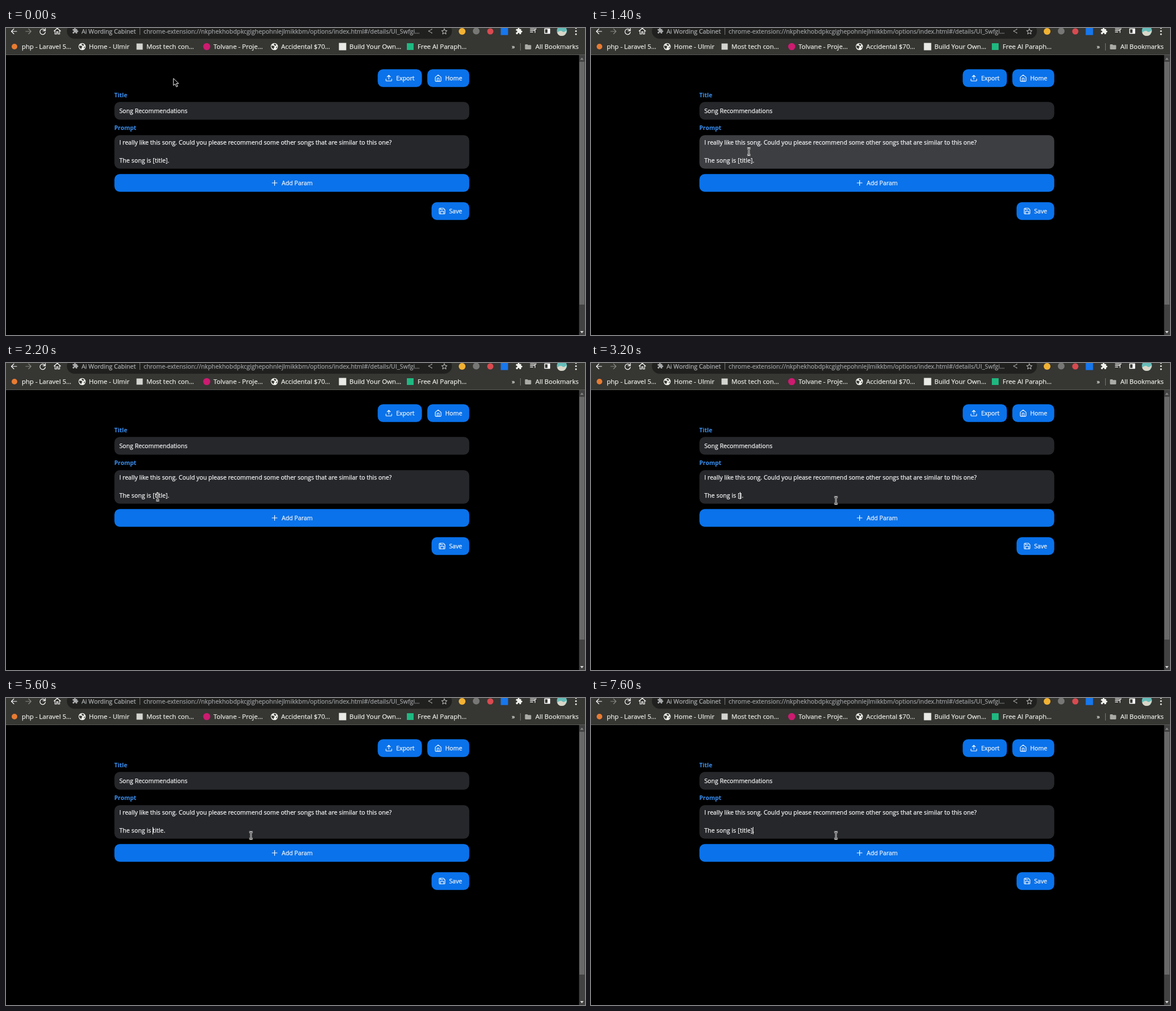
An HTML page for the animation above (8000 ms loop, 1027 by 545 pixels).

```html
<!DOCTYPE html>
<html lang="en">
<head>
<meta charset="utf-8">
<title>Prompt editor</title>
<style>
  html, body { margin: 0; width: 100%; height: 100%; overflow: hidden; background: #000; }
  svg { display: block; }
  text {
    font: 10.67px "Open Sans", "Noto Sans", sans-serif; white-space: pre;
    fill: #f4f5f6; stroke: #f4f5f6; stroke-width: 0.25;
  }
  .label { font-weight: 700; font-size: 10.5px; fill: #3a8ff0; stroke: none; }
  .mark { font-size: 11.5px; fill: #eaeae6; stroke: #eaeae6; }
  .url { font-size: 10.8px; fill: #9c9da0; stroke: #9c9da0; }
  .button { fill: #0a72ea; }
  .field { fill: #26272a; }
  .line { fill: none; stroke: #fff; stroke-width: 2; stroke-linecap: round; stroke-linejoin: round; }
  .beam { fill: none; stroke: #fff; stroke-width: 2.8; }
  .beam + .beam { stroke: #000; stroke-width: 1; }
  #line { letter-spacing: 0.08px; }
</style>
</head>
<body>
<svg id="stage" width="1027" height="545" viewBox="0 0 1027 545">
  <g id="browser">
    <path fill="#363633" d="M0 0h1027v47H0z"/>
    <path fill="#5b5b58" d="M0 47h1027v1H0z"/>
    <rect x="108" y="-8" width="683" height="27" rx="13.5" fill="#20211f"/>
    <path stroke="#777" d="M237.5 0v12M912.5 27v13"/>
    <path fill="#424242" d="M1016.5 48h10.5v497h-10.5z"/>
    <path fill="#696969" d="M1017 60h9v431h-9z"/>
    <path fill="#858585" d="M1018.5 56.5l3-4 3 4z"/>
    <path fill="#d8d8d8" d="M1018.5 538l3 4 3-4z"/>
  </g>
  <g id="page">
    <rect class="field" x="192.3" y="131.3" width="629.4" height="31.4" rx="9.6"/>
    <rect class="field" id="area" x="192.3" y="190.3" width="629.4" height="59.4" rx="9.6"/>
  </g>
  <rect id="selection" y="227" height="18" fill="#3367d1"/>
  <text id="line" x="201" y="239"></text>
  <rect id="caret" y="229" width="1" height="13" fill="#fff"/>
  <path id="arrow" fill="#000" stroke="#fff" d="M0 0v12.5l3-2.7 2.3 5.2 2.2-1-2.3-5h4z"/>
  <g id="ibeam">
    <path class="beam" d="M-3-6h2L0-5l1-1h2M0-5V5M-3 6h2L0 5l1 1h2"/>
    <path class="beam" d="M-3-6h2L0-5l1-1h2M0-5V5M-3 6h2L0 5l1 1h2"/>
  </g>
</svg>
<script>
const $ = id => document.getElementById(id);
const browser = $('browser'), page = $('page');

function add(parent, tag, attrs, content = '') {
  const el = document.createElementNS('http://www.w3.org/2000/svg', tag);
  for (const key in attrs) el.setAttribute(key, attrs[key]);
  el.textContent = content;
  parent.append(el);
  return el;
}
const text = (parent, x, y, content, cls = '') => add(parent, 'text', { x, y, class: cls }, content);
const dot = (x, y, r, fill) => add(browser, 'circle', { cx: x, cy: y, r, fill });
const square = (x, y, size, fill) =>
  add(browser, 'rect', { x: x - size / 2, y: y - size / 2, width: size, height: size, fill });

// Icons are drawn on a 24 unit grid centred at x, y.
const place = (x, y, scale) => `translate(${x} ${y}) scale(${scale}) translate(-12 -12)`;
const outline = (parent, d, x, y, scale = 0.56, style = '') =>
  add(parent, 'path', { d, class: 'line', transform: place(x, y, scale), style });
const solid = (d, x, y, scale, fill) =>
  add(browser, 'path', { d, fill, transform: place(x, y, scale) });

const ICON = {
  back: 'M21 12H4M12 4l-8 8 8 8',
  forward: 'M3 12h17M12 4l8 8-8 8',
  reload: 'M20 4v7h-7M19 10a8 8 0 1 0 1 5',
  house: 'M2 12L12 3l10 9M5 10v11h5v-7h4v7h5V10',
  puzzle: 'M20.5 11H19V7c0-1.1-.9-2-2-2h-4V3.5a2.5 2.5 0 0 0-5 0V5H4c-1.1 0-2 .9-2 2v3.8h1.5a2.7 2.7 0 0 1 0 5.4H2V20c0 1.1.9 2 2 2h3.8v-1.5a2.7 2.7 0 0 1 5.4 0V22H17c1.1 0 2-.9 2-2v-4h1.5a2.5 2.5 0 0 0 0-5z',
  share: 'M18 5L6 12l12 7M18 4v2M18 18v2M6 11v2',
  star: 'M12 2l3 7 7 .6-5.4 4.8L18.3 22 12 18l-6.3 4 1.7-7.6L2 9.6 9 9z',
  queue: 'M3 5h13M3 10h13M3 15h8M18 17V5h4',
  panel: 'M3 4h18v16H3z',
  folder: 'M2 6q0-2 2-2h6l2 2h8q2 0 2 2v10q0 2-2 2H4q-2 0-2-2z',
  land: 'M3 9l7 1 3 3-3 3v4L4 15zM11 3l7 3-2 4-5-2zM17 13l4-1-3 6z',
  upload: 'M3 15v4a2 2 0 0 0 2 2h14a2 2 0 0 0 2-2v-4M17 8l-5-5-5 5M12 3v12',
  home: 'M3 9l9-7 9 7v11a2 2 0 0 1-2 2H5a2 2 0 0 1-2-2zM9 22V12h6v10',
  save: 'M19 21H5a2 2 0 0 1-2-2V5a2 2 0 0 1 2-2h11l5 5v11a2 2 0 0 1-2 2zM17 21v-8H7v8M7 3v5h8',
  plus: 'M4 12h16M12 4v16'
};

function button(x, y, right, icon, iconX, label, labelX) {
  add(page, 'rect', { class: 'button', x, y, width: right - x, height: 31.4, rx: 9.6 });
  outline(page, ICON[icon], iconX, y + 15.7, 0.56);
  text(page, labelX, Math.round(y) + 20, label);
}
function globe(x) {
  dot(x, 33, 6.3, '#f1f1ee');
  solid(ICON.land, x, 33, 0.6, '#363633');
}

// Toolbar
outline(browser, ICON.back, 14, 6);
outline(browser, ICON.forward, 40, 6, 0.56, 'stroke:#878783');
outline(browser, ICON.reload, 65, 5.5, 0.6);
outline(browser, ICON.house, 91, 5.5, 0.58);
solid(ICON.puzzle, 123, 5, 0.48, '#a9aaac');
text(browser, 134, 10, 'Ai Wording Cabinet', 'url').style.fill = '#b8b9bb';
text(browser, 244, 10, 'chrome-extension://nkphekhobdpkcgighepohnlejlmikkbm/options/index.html#/details/UI_Swfgi…', 'url');
outline(browser, ICON.share, 752.5, 5.5, 0.46, 'stroke:#c4c4c2');
outline(browser, ICON.star, 777.5, 6, 0.48, 'stroke:#d5d5d2');
dot(809, 6, 6, '#f2b233');
dot(834, 5.5, 6, '#777876');
dot(859, 6, 5.5, '#d94a50');
square(884, 6, 13, '#1677ee');
solid(ICON.puzzle, 910, 5.5, 0.54, '#f1f1ee');
outline(browser, ICON.queue, 935, 5.5, 0.56);
outline(browser, ICON.panel, 960, 5.5, 0.5, 'stroke-width:2.8');
solid('M13 4h8v16h-8z', 960, 5.5, 0.5, '#fff');
dot(986, 5, 9, '#65bdb9');
add(browser, 'path', { d: 'M977.5 8q6-5 9-2t8-2q-1 10-9 10-6 0-8-6z', fill: '#d9d6c8' });
for (const y of [0, 5.5, 11]) dot(1011, y, 1.5, '#f1f1ee');

// Bookmarks
dot(15, 33, 5, '#e87b32');
globe(135);
square(237, 33, 11, '#d4d4d0');
dot(356, 33, 6.3, '#cc1b70');
globe(476);
square(597, 33, 13, '#e9e9e6');
square(717, 33, 12, '#1fb881');
const marks = [
  [28, 'php - Laravel 5…'], [147, 'Home - Ulmir'], [249, 'Most tech con…'],
  [368, 'Tolvane - Proje…'], [488, 'Accidental $70…'], [609, 'Build Your Own…'],
  [730, 'Free AI Paraph…'], [897, '»'], [939, 'All Bookmarks']
];
for (const [x, name] of marks) text(browser, x, 37, name, 'mark');
solid(ICON.folder, 926, 33.5, 0.55, '#aaaaa6');

// Form
button(659.3, 73.3, 737.7, 'upload', 679, 'Export', 692);
button(747.3, 73.3, 821.7, 'home', 766.5, 'Home', 779);
button(192.3, 259.3, 821.7, 'plus', 476.5, 'Add Param', 489);
button(754.8, 309.3, 821.7, 'save', 773.5, 'Save', 786);
text(page, 192, 123, 'Title', 'label');
text(page, 192, 181, 'Prompt', 'label');
text(page, 201, 151, 'Song Recommendations');
text(page, 201, 207, 'I really like this song. Could you please recommend some other songs that are similar to this one?');

// Steps: [time, pointer x, pointer y]
const pointer = [
  [0, 297, 89.5], [1100, 295, 98], [1300, 270, 178.5], [1400, 280, 219.5],
  [1600, 284, 227], [1700, 287, 234], [1800, 280, 241], [1900, 269, 238],
  [2400, 340, 238], [2500, 417, 235], [2700, 428, 240], [2800, 434.5, 244]
];
// Steps: [time, end of the sentence, caret position in it or -1]
const edits = [
  [0, '[title].', -1], [2100, '[title].', 2], [2300, '[title].', -1],
  [3200, '[].', 1], [3500, '].', 0], [3900, '].', 1], [4100, '.', 0],
  [4400, 't.', 1], [4600, 'ti.', 2], [4800, 'titl.', 4], [4900, 'title.', 5],
  [5500, 'title.', 3], [5600, 'title.', 0], [6200, '[title.', 1],
  [6700, '[title.', 6], [7300, '[title.', -1], [7600, '[title].', 7]
];
const PREFIX = 'The song is ';
const line = $('line'), caret = $('caret'), selection = $('selection');
const at = (steps, t) => steps.findLast(step => step[0] <= t);
const show = (el, on) => el.setAttribute('visibility', on ? 'visible' : 'hidden');
const xOf = index => 201 + line.getSubStringLength(0, PREFIX.length + index);

function draw(t) {
  const [, x, y] = at(pointer, t);
  for (const id of ['arrow', 'ibeam']) {
    $(id).setAttribute('transform', `translate(${x} ${y})`);
    show($(id), (id === 'arrow') === t < 1300);
  }
  $('area').style.fill = t >= 1400 && t < 2100 ? '#3d3e42' : '';

  const [, ending, index] = at(edits, t);
  line.textContent = PREFIX + ending;
  show(caret, index >= 0);
  if (index >= 0) caret.setAttribute('x', Math.round(xOf(index)));

  const selected = t >= 2300 && t < 3200;
  show(selection, selected);
  if (selected) {
    selection.setAttribute('x', xOf(1));
    selection.setAttribute('width', xOf(6) - xOf(1));
  }
}
function tick() {
  draw(performance.now() % 8000);
  requestAnimationFrame(tick);
}
tick();
</script>
</body>
</html>
```
